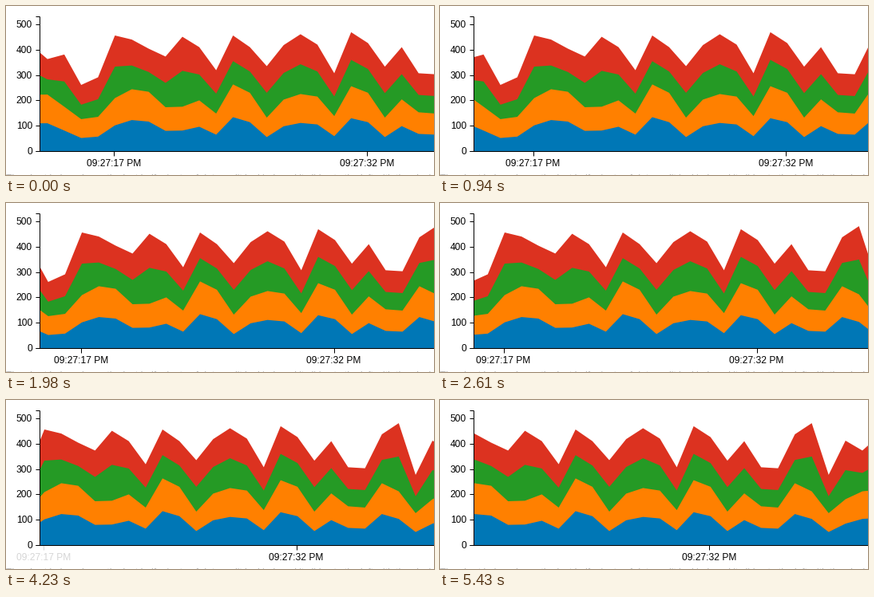
A matplotlib script that plays this animation: 536x212 px, repeating every 5.45 s.

```python
import numpy as np
import matplotlib.pyplot as plt
from matplotlib.animation import FuncAnimation
from matplotlib.patches import Polygon, Rectangle

W, H, DPI = 536, 212, 100
PX = 72 / DPI                     # points per pixel
LEFT, BASE, TOP = 42, 182, 13     # axis origin and upper end
UNIT = 0.318                      # pixels per value
STEP = 21.13                      # pixels per second
START = 136.4                     # where second zero begins
STEP_MS, FRAMES = 50, 109

plt.rcParams["font.family"] = "Liberation Sans"

# One reading per second, from five seconds before the first label
total = np.array([420, 363, 381, 261, 291, 456, 440, 404, 373, 451, 410,
                  319, 456, 410, 335, 418, 461, 420, 307, 469, 426, 333,
                  410, 307, 303, 437, 481, 277, 412, 373, 432])
middle = np.array([222, 223, 175, 126, 135, 209, 244, 234, 173, 175, 200,
                   148, 263, 230, 132, 203, 225, 215, 138, 256, 230, 132,
                   204, 153, 148, 244, 212, 126, 181, 212, 219])
seconds = np.arange(len(total)) - 5


def split(low, high):
    """Boundary between two stacked layers; the lower one swings more."""
    return low + 0.6 * (high - low) - 24


# Stacked tops, uppermost layer first
LAYERS = [("#dc3220", total), ("#259a25", split(middle, total)),
          ("#ff8000", middle), ("#0077b6", split(0, middle))]

fig = plt.figure(figsize=(W / DPI, H / DPI), dpi=DPI, facecolor="white")
ax = fig.add_axes([0, 0, 1, 1])
ax.set_xlim(0, W)
ax.set_ylim(H, 0)
ax.axis("off")


def line(x, y):
    return ax.plot(x, y, color="black", lw=PX, zorder=3,
                   solid_capstyle="butt")[0]


def label(x, y, text, align="center", color="black"):
    return ax.text(x, y, text, ha=align, va="baseline", color=color,
                   fontsize=12 * PX, zorder=4)


def outline(tops, scroll):
    x = START + seconds * STEP - scroll
    y = BASE - tops * UNIT
    return np.vstack([[x[0], BASE], np.column_stack([x, y]), [x[-1], BASE]])


window = Rectangle((LEFT + 1, 0), W, H, transform=ax.transData)
areas = []
for color, tops in LAYERS:
    area = Polygon(outline(tops, 0), fc=color, ec="none", zorder=2)
    ax.add_patch(area)
    area.set_clip_path(window)
    areas.append(area)

line([LEFT, LEFT], [TOP, BASE])
line([LEFT - 5, LEFT], [TOP, TOP])
line([LEFT - 5, W], [BASE, BASE])
for value in range(0, 501, 100):
    y = round(BASE - value * UNIT)
    line([LEFT - 5, LEFT], [y, y])
    label(33, y + 4, value, "right")

ticks = []
for second in (17, 32):
    x = 135 + (second - 17) * STEP
    ticks.append((x, line([x, x], [BASE, BASE + 6]),
                  label(x, 201, f"09:27:{second} PM")))

# Top edge of the paragraph below the chart
label(0, 220, "The chart below shows the last half minute of data, split by "
      "kind, and it slides to the left with the clock.", "left", "#bbbbbb")


def draw(i):
    t = i * STEP_MS / 1000 + 0.01
    # Steady scroll with a short stall near four seconds
    scroll = np.interp(t, [0.06, 3.97, 4.06, 5.43], [0, 85, 85, 115])
    for area, (_, tops) in zip(areas, LAYERS):
        area.set_xy(outline(tops, scroll))
    fade = np.interp(t, [3.34, 4.38], [1, 0])
    for (x, mark, text), alpha in zip(ticks, (fade, 1)):
        mark.set_xdata([x - scroll] * 2)
        text.set_x(x - scroll)
        mark.set_alpha(alpha)
        text.set_alpha(alpha)
    return []


anim = FuncAnimation(fig, draw, frames=FRAMES, interval=STEP_MS,
                     repeat=True, repeat_delay=0)
plt.show()
```
